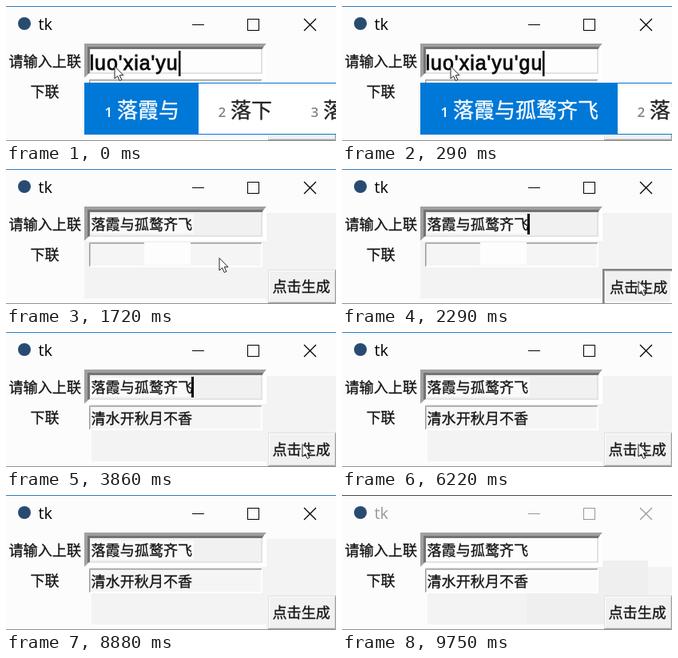
An HTML page for the animation above (9800 ms loop, 413 by 169 pixels).

```html
<!DOCTYPE html>
<html lang="zh">
<head>
<meta charset="utf-8">
<title>tk</title>
<style>
html, body { margin: 0; width: 100%; height: 100%; overflow: hidden; background: #fcfcfc; }
svg { display: block; width: 413px; height: 169px; }
text { font: 18.1px "Noto Sans CJK SC", "Noto Sans CJK", sans-serif; fill: #141414; stroke: #141414; stroke-width: .3px; white-space: pre; }
#title { font: 20px "Open Sans", sans-serif; stroke: none; }
#pinyin { font: 25px "Liberation Sans", Arial, sans-serif; letter-spacing: 1px; fill: #0a0a0a; stroke: #0a0a0a; stroke-width: .8px; }
.num { font: 600 17px "Open Sans", sans-serif; fill: #858585; stroke: none; }
.word { font-size: 26px; fill: #222; stroke: #222; }
.pick text { fill: #fff; }
.pick .word { stroke: #fff; }
</style>
</head>
<body>
<svg viewBox="0 0 413 169">
  <rect width="413" height="169" fill="#fcfcfc"/>
  <g id="shade" fill="#f3f3f3">
    <rect id="side" x="326" y="55" width="87"/>
    <rect id="floor" y="90" height="72"/>
    <rect id="late" x="231" y="82" width="152" height="80" fill="#efefef"/>
  </g>

  <rect id="edge" width="413" height="1"/>
  <rect y="168" width="413" height="1" fill="#929292"/>
  <circle cx="23" cy="22" r="8" fill="#294b72"/>
  <text id="title" x="40.5" y="30">tk</text>
  <g id="controls" fill="none">
    <path d="M233 23.5H248M302.5 16.5H316.5V30.5H302.5Z" shape-rendering="crispEdges"/>
    <path d="M373 16L388 31M388 16L373 31" stroke-width="1.3"/>
  </g>

  <text x="3.5" y="76">请输入上联</text>
  <text x="30.5" y="114">下联</text>

  <path d="M98 90V47H326L321 53H104V84Z" fill="#a0a0a0"/>
  <path d="M102 85V51H323L321 54H105V84Z" fill="#737373"/>
  <path d="M326 47V90H98L104 85H321V53Z" fill="#fff"/>
  <rect x="105" y="54" width="216" height="31" fill="#e3e3e3"/>
  <rect id="field" x="105" y="54" width="214" height="29"/>
  <rect id="textBack" x="106" y="57" width="129" height="24" fill="#fafafa"/>
  <text id="pinyin" x="104.5" y="80"></text>
  <text id="upper" x="106.5" y="76">落霞与孤鹜齐飞</text>
  <rect id="caret" fill="#000"/>

  <rect x="104" y="92" width="217" height="31" fill="#fff"/>
  <rect id="field2" x="105" y="94" width="214" height="27"/>
  <path d="M104.5 122V92.5H320" fill="none" stroke="#9a9a9a"/>
  <path d="M105.5 121V93.5H319" fill="none" stroke="#c9c9c9"/>
  <rect id="patch" x="173" y="92" width="58" height="28" fill="#fdfdfd"/>
  <text id="lower" x="106.5" y="115">清水开秋月不香</text>

  <rect x="328" y="126" width="85" height="42" fill="#f1f1f1"/>
  <path d="M328.5 167V126.5H412" fill="none" stroke="#dedede"/>
  <path d="M329.5 166V127.5H411" fill="none" stroke="#fff"/>
  <path d="M328 167.5H412.5V126" fill="none" stroke="#a0a0a0"/>
  <path d="M330 166.5H411.5V128" fill="none" stroke="#d6d6d6"/>
  <g id="pressed" fill="none">
    <path d="M327 168V126H413" stroke="#828282" stroke-width="2"/>
    <path d="M328.5 167V127.5H412" stroke="#b0b0b0"/>
    <path d="M329 167H412V128" stroke="#fff" stroke-width="2"/>
  </g>
  <text id="label" x="333.5" y="154">点击生成</text>

  <g id="popup">
    <rect x="98.5" y="96.5" width="330" height="64" fill="#fff" stroke="#0078d7"/>
    <g id="items"></g>
  </g>
  <path id="mouse" d="M0 0V15.5L3.6 12.2L6.2 18L8.8 16.9L6.3 11.2H11Z" fill="#fff" stroke="#222"/>
</svg>
<script>
const LOOP = 9800;
const el = {};
document.querySelectorAll("[id]").forEach(n => el[n.id] = n);

const put = (node, attrs) => {
  for (const k in attrs) node.setAttribute(k, attrs[k]);
};
const show = (node, on) => { node.style.display = on ? "" : "none"; };

// Start time, typed letters, caret x, candidates
const typing = [
  [0, "luo'xia'yu", 216, ["落霞与", "落下", "落霞"]],
  [130, "luo'xia'yu'g", 236, ["落霞与孤", "落霞与", "落下"]],
  [250, "luo'xia'yu'gu", 251, ["落霞与孤鹜齐飞", "落霞与", "落下"]]
];
// Caret toggles, starting with on
const blinks = [1090, 1690, 2010, 2650, 2960, 3560, 3860, 4460, 4730, 5350,
  5630, 6220, 6530, 7120, 7430, 8030, 8290, 8880, 9150, 9750];
// start, end, steps, from, to
const moves = [
  [1550, 1800, 8, [136, 75], [345, 132]],
  [1950, 2070, 5, [345, 132], [371, 140]],
  [7980, 8290, 12, [371, 140], [366, 172]]
];

function drawItems(words) {
  let x = 99, html = "";
  words.forEach((word, i) => {
    const w = 64 + 26 * word.length;
    html += `<g class="${i ? "" : "pick"}">` +
      (i ? "" : `<rect x="${x}" y="97" width="${w}" height="63" fill="#0078d7"/>`) +
      `<text class="num" x="${x + 24.5}" y="139">${i + 1}</text>` +
      `<text class="word" x="${x + 40}" y="140">${word}</text></g>`;
    x += w;
  });
  el.items.innerHTML = html;
}

function mouseAt(t) {
  let pos = moves[0][3];
  for (const [start, end, steps, a, b] of moves) {
    if (t < start) break;
    const n = Math.floor((t - start) / (end - start) * (steps - 1) + 1e-6) + 1;
    const p = Math.min(1, n / steps);
    pos = a.map((v, i) => v + (b[i] - v) * p);
  }
  return pos;
}

let shown = null;
function draw(t) {
  const composing = t < 870, done = t >= 2650, idle = t >= 9750;
  const down = t >= 2290 && !done;
  const step = typing.filter(s => t >= s[0]).pop();
  if (step !== shown) {
    shown = step;
    el.pinyin.textContent = step[1];
    drawItems(step[3]);
  }
  show(el.popup, t < 840);
  show(el.pinyin, composing);
  show(el.upper, !composing);
  show(el.textBack, !composing && !idle);
  show(el.lower, done);
  show(el.patch, !composing && !done);
  show(el.pressed, down);
  put(el.label, { x: down ? 335 : 333.5, y: down ? 155 : 154 });

  const blinkOn = blinks.filter(b => t >= b).length % 2 === 1;
  show(el.caret, t < 820 || blinkOn);
  put(el.caret, composing
    ? { x: step[2], y: 56, width: 2.5, height: 32 }
    : { x: 232, y: 56, width: 3, height: 26 });

  put(el.field, { fill: composing || idle ? "#fdfdfd" : "#f1f1f1" });
  put(el.field2, { fill: idle ? "#fbfbfb" : "#f5f5f5" });
  show(el.side, t >= 840 && !idle);
  put(el.side, { height: composing ? 42 : 113 });
  show(el.floor, t >= 840);
  put(el.floor, { x: done ? 107 : 98, width: done ? 306 : 230 });
  show(el.late, idle);

  put(el.edge, { fill: idle ? "#4a4a4a" : "#2a7fc4" });
  el.title.style.fill = idle ? "#999" : "#000";
  put(el.controls, { stroke: idle ? "#999" : "#000" });

  const [x, y] = mouseAt(t);
  put(el.mouse, { transform: `translate(${Math.round(x)} ${Math.round(y) + .5})` });
}

const began = performance.now();
function tick() {
  draw((performance.now() - began) % LOOP);
  requestAnimationFrame(tick);
}
tick();
</script>
</body>
</html>
```
